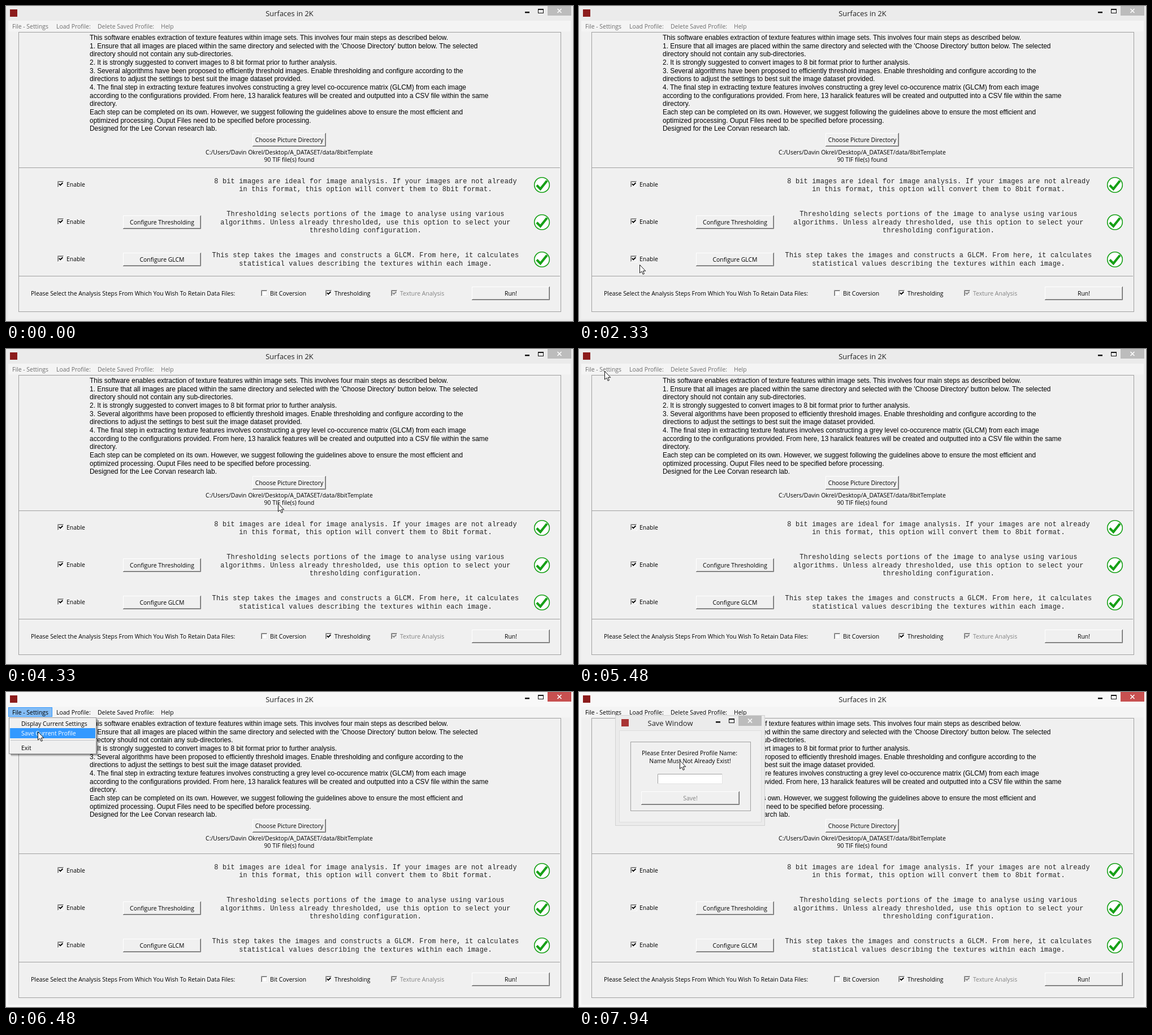
Animation, 1003 px wide and 558 px high, one loop 8 s. Source, as an HTML page:

```html
<!DOCTYPE html>
<html lang="en">
<head>
<meta charset="utf-8">
<title>Texture analysis window</title>
<style>
html, body { margin: 0; width: 100%; height: 100%; overflow: hidden; background: #ebebeb; }
svg { display: block; width: 1003px; height: 558px; }
text { font: 10.45px "Open Sans", "Noto Sans", sans-serif; fill: #000; }
text.title { font-size: 12.9px; fill: #222; }
text.intro { font: 11.95px "Liberation Sans", Arial, sans-serif; }
text.mono { font: 11.92px "Liberation Mono", "Courier New", monospace; letter-spacing: .19px; fill: #222; }
text.off { fill: #838383; }
.mid { text-anchor: middle; }
</style>
</head>
<body>
<svg id="stage" viewBox="0 0 1003 558"></svg>
<script>
const rect = (x, y, w, h, fill, extra = '') =>
  `<rect x="${x}" y="${y}" width="${w}" height="${h}" fill="${fill}" ${extra}/>`;
const box = (x, y, w, h, stroke = '#a0a0a0', fill = 'none') =>
  rect(x + .5, y + .5, w - 1, h - 1, fill, `stroke="${stroke}"`);
const path = (d, stroke, width = 1) =>
  `<path d="${d}" fill="none" stroke="${stroke}" stroke-width="${width}"/>`;
const text = (x, y, s, cls = '') => `<text x="${x}" y="${y}" class="${cls}">${s}</text>`;
const group = (id, body) => `<g id="${id}">${body}</g>`;

// Two-pixel bevel: top/left edges first, bottom/right edges second.
const bevel = (x, y, w, h, [lit, lit2, dark, dark2], fill) =>
  rect(x, y, w, h, fill) +
  path(`M${x + 1.5} ${y + h - 2}V${y + 1.5}H${x + w - 2}`, lit2) +
  path(`M${x + 1} ${y + h - 1.5}H${x + w - 1.5}V${y + 1}`, dark2) +
  path(`M${x + .5} ${y + h - 1}V${y + .5}H${x + w - 1}`, lit) +
  path(`M${x} ${y + h - .5}H${x + w - .5}V${y}`, dark);
const raised = ['#fff', '#f0f0f0', '#696969', '#a0a0a0'];
const sunken = ['#a0a0a0', '#696969', '#fff', '#e3e3e3'];

const button = (x, y, w, label, cls = '') =>
  bevel(x, y, w, 24, raised, '#f0f0f0') + text(x + w / 2, y + 15.8, label, 'mid ' + cls);

const check = (x, y, label, on = true, off = false) =>
  bevel(x, y, 12, 12, sunken, off ? '#f0f0f0' : '#fff') +
  (on ? path(`M${x + 3} ${y + 5}l2.2 2.4L${x + 9.3} ${y + 3.3}`, off ? '#888' : '#000', 2) : '') +
  text(x + 16, y + 10, label, off ? 'off' : '');

const tick = y =>
  `<circle cx="948" cy="${y}" r="13.3" fill="#fff" stroke="#16a016" stroke-width="1.6"/>` +
  path(`M938.8 ${y + .5}L945.3 ${y + 7}L957 ${y - 7.5}`, '#16a016', 4.2);

// Title bar controls, placed by the close button's corner.
const controls = (x, y, w, h, id) =>
  rect(x - 40, y + 10, 8, 2.5, '#111') + rect(x - 16.5, y + 5.5, 9, 7, 'none', 'stroke="#111"') +
  rect(x - 17, y + 5, 10, 2, '#111') + rect(x, y, w, h, '#bcbcbc', `id="${id}"`) +
  path(`M${x + w / 2 - 3.5} ${y + h / 2 - 3.5}l7 7m0 -7l-7 7`, '#fff', 1.6);

const intro = [
  'This software enables extraction of texture features within image sets. This involves four main steps as described below.',
  "1. Ensure that all images are placed within the same directory and selected with the 'Choose Directory' button below. The selected",
  'directory should not contain any sub-directories.',
  '2. It is strongly suggested to convert images to 8 bit format prior to further analysis.',
  '3. Several algorithms have been proposed to efficiently threshold images. Enable thresholding and configure according to the',
  'directions to adjust the settings to best suit the image dataset provided.',
  '4. The final step in extracting texture features involves constructing a grey level co-occurence matrix (GLCM) from each image',
  'according to the configurations provided. From here, 13 haralick features will be created and outputted into a CSV file within the same',
  'directory.',
  'Each step can be completed on its own. However, we suggest following the guidelines above to ensure the most efficient and',
  'optimized processing. Ouput Files need to be specified before processing.',
  'Designed for the Lee Corvan research lab.'
];
const steps = [
  [313.5, '8 bit images are ideal for image analysis. If your images are not already',
    'in this format, this option will convert them to 8bit format.'],
  [372, 'Thresholding selects portions of the image to analyse using various',
    'algorithms. Unless already thresholded, use this option to select your',
    'thresholding configuration.'],
  [445, 'This step takes the images and constructs a GLCM. From here, it calculates',
    'statistical values describing the textures within each image.']
];

const mainWindow =
  rect(0, 0, 1003, 558, '#ebebeb', 'id="frame"') + rect(4, 26, 995, 528, '#f0f0f0') +
  rect(4, 26, 995, 19, '#f4f4f4') +
  rect(7, 6, 13, 13, '#8c1c1c') + text(501.5, 17.5, 'Surfaces in 2K', 'title mid') +
  controls(958, 0, 42, 17, 'close') +
  rect(4.5, 27.5, 77, 16, '#84bdf5', 'id="fileHot" stroke="#3399ff"') +
  group('bar', text(11, 40, 'File - Settings') + text(89, 40, 'Load Profile:') +
    text(162, 40, 'Delete Saved Profile:') + text(274, 40, 'Help')) +
  box(22, 46, 960, 496) + path('M23 286.5H980M23 478.5H980', '#a0a0a0') +
  intro.map((s, i) => text(148, 60 + 14.67 * i, s, 'intro')).join('') +
  button(436, 225, 130, 'Choose Picture Directory') +
  text(501, 262.5, 'C:/Users/Davin Okrel/Desktop/A_DATASET/data/8bitTemplate', 'mid') +
  text(501, 276, '90 TIF file(s) found', 'mid') +
  [316, 382, 448].map(y => check(91, y - 6, 'Enable') + tick(y + 1)).join('') +
  button(207, 371, 138, 'Configure Thresholding') + button(207, 437, 138, 'Configure GLCM') +
  steps.map(([y, ...lines]) =>
    lines.map((s, i) => text(636, y + 14.67 * i, s, 'mono mid')).join('')).join('') +
  text(44, 513, 'Please Select the Analysis Steps From Which You Wish To Retain Data Files:') +
  check(451, 503, 'Bit Coversion', false) + check(565, 503, 'Thresholding') +
  check(681, 503, 'Texture Analysis', true, true) + button(824, 497, 138, 'Run!');

const item = (id, y, label) =>
  group(id, rect(7, y, 151, 18, '#3399ff') + text(27, y + 13, label));
const menu =
  rect(9, 49, 155, 65, '#000', 'opacity=".12"') + rect(8, 48, 154, 64, '#000', 'opacity=".3"') +
  box(5, 45, 155, 65, '#979797', '#f0f0f0') +
  item('show', 47, 'Display Current Settings') + item('save', 64, 'Save Current Profile') +
  path('M8 85.5H157', '#c4c4c4') + text(27, 103, 'Exit');

const dialog =
  box(64, 41, 265, 196, '#d2d2d2', '#ebebeb') + box(71, 68, 252, 163, '#dedede', '#f0f0f0') +
  rect(75, 48, 13, 13, '#a83434') + text(161.5, 59.5, 'Save Window', 'title mid') +
  controls(282, 42, 41, 18, 'dialogClose') + box(91, 88, 213, 123) +
  text(195.5, 112, 'Please Enter Desired Profile Name:', 'mid') +
  text(196.5, 126, 'Name Must Not Already Exist!', 'mid') +
  bevel(139, 145, 115, 18, ['#a0a0a0', '#fff', '#e3e3e3', '#fff'], '#fff') +
  button(110, 176, 174, 'Save!', 'off');

const $ = id => document.getElementById(id);
$('stage').innerHTML = mainWindow + group('menu', menu) +
  item('ghost', 64, 'Save Current Profile') + group('dialog', dialog) +
  '<path id="cursor" d="M.5 .5V15L3.8 12L6.2 17.3L8.4 16.3L6.2 11.3H10.7Z" fill="#fff" stroke="#111" stroke-width="1"/>';
$('ghost').lastChild.style.fill = '#fff';

// Pointer moves: first beat, last beat, destination.
const moves = [
  [3, 4, 837, 546], [4, 9, 640, 480], [12, 13, 635, 478], [13, 17, 562, 509], [17, 19, 577, 520],
  [21, 28, 105, 461], [28, 30, 107, 458], [32, 39, 94, 322], [42, 52, 546, 275],
  [55, 56, 481, 273], [56, 57, 313, 268], [60, 71, 45, 39], [79, 84, 56, 70], [97, 103, 178, 121]
];
const clamp = v => Math.max(0, Math.min(1, v));

function pointer(beat) {
  let x = 880, y = 570;
  for (const [from, to, tx, ty] of moves) {
    const p = clamp((beat - from) / (to - from)), e = p * p * (3 - 2 * p);
    x += (tx - x) * e;
    y += (ty - y) * e;
  }
  return [Math.round(x), Math.round(y)];
}

function select(id, on) {
  $(id).firstChild.style.opacity = on ? 1 : 0;
  $(id).lastChild.style.fill = on ? '#fff' : '#000';
}

function draw(time) {
  // The screen refreshes 13 times a second.
  const beat = Math.floor((time % 8000 - 12) * 13 / 1000);
  const active = beat >= 73, open = active && beat < 94;
  const [x, y] = pointer(beat);
  $('cursor').setAttribute('transform', `translate(${x} ${y})`);
  $('frame').style.fill = active ? '#f8f8f8' : '#ebebeb';
  $('close').style.fill = active ? '#c75050' : '#bcbcbc';
  for (const t of $('bar').children) t.style.fill = active ? '#000' : '#6d6d6d';
  $('fileHot').style.opacity = open ? 1 : 0;
  $('menu').style.opacity = open ? clamp((beat - 72) / 3) : 0;
  select('show', y >= 47 && y < 64);
  select('save', y >= 64);
  $('ghost').style.opacity = beat < 94 ? 0 : clamp(1 - (beat - 94) * .45);
  const fade = clamp((beat - 94) / 3), scale = .94 + .06 * fade;
  $('dialog').style.opacity = fade;
  $('dialog').setAttribute('transform',
    `translate(196.5 138) scale(${scale}) translate(-196.5 -138)`);
}

const start = performance.now();
function loop() {
  draw(performance.now() - start);
  requestAnimationFrame(loop);
}
loop();
</script>
</body>
</html>
```
